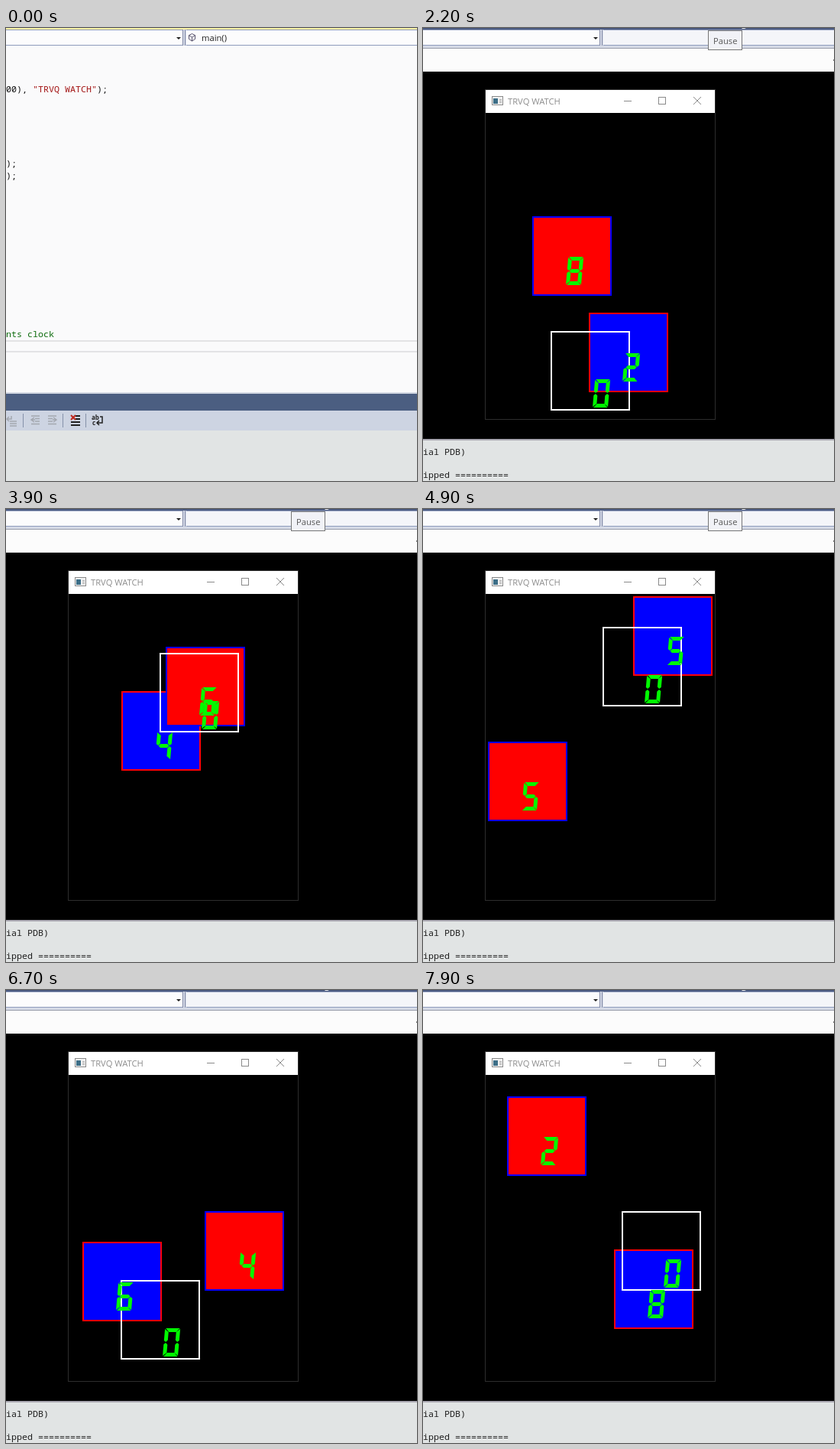
Animation, 538 px wide and 592 px high, one loop 8000 ms. Source, as an HTML page:

```html
<!DOCTYPE html>
<html lang="en">
<head>
<meta charset="utf-8">
<title>Bouncing clock</title>
<style>
  html, body { margin: 0; width: 100%; height: 100%; overflow: hidden; background: #000; }
  svg { display: block; width: 538px; height: 592px; }
  text { font: 11.2px "Open Sans", "Noto Sans", sans-serif; white-space: pre; }
  .code { font: 11.67px "Noto Sans Mono", "DejaVu Sans Mono", monospace; }
  .crisp { shape-rendering: crispEdges; }
  .digit { fill: #00fa00; }
</style>
</head>
<body>
<svg viewBox="0 0 538 592">
  <defs>
    <clipPath id="client"><rect x="82" y="111" width="300" height="400"/></clipPath>
    <g id="nav">
      <rect y="3" width="538" height="20" fill="#fcfcfd"/>
      <path d="M0 2.5H538M0 22.5H538" stroke="#8e9bbc"/>
      <rect x="231" y="2" width="5" height="21" fill="#d6dbe9"/>
      <path d="M231.5 2V23M234.5 2V23" stroke="#8088a4"/>
      <path d="M223 12h6l-3 3z" fill="#1e1e1e"/>
      <text class="code" x="-5" y="17">)</text>
    </g>
    <g id="indent" fill="none" stroke="#a4a8b0" stroke-width="1.5">
      <path d="M1 1H12M6 4.5H12M6 8H12M1 11.5H12M5 3L1 6l4 3M1 6H6"/>
    </g>
  </defs>

  <g id="editor">
    <rect width="538" height="592" fill="#fafafb"/>
    <rect width="538" height="2" fill="#fff0a5"/>
    <use href="#nav"/>
    <path d="M243.500 7.500l4 2v5l-4 2.500-4-2.500v-5zM239.500 9.500l4 2.500 4-2.500M243.500 12v5" fill="none" stroke="#55506a"/>
    <text x="256" y="17" fill="#1e1e1e">main()</text>
    <g class="code" fill="#111">
      <text class="code" y="84">00), <tspan fill="#a31515">"TRVQ WATCH"</tspan>);</text>
      <text class="code" y="181">);</text>
      <text class="code" y="197">);</text>
      <text class="code" y="404" fill="#0b6b0b">nts clock</text>
    </g>
    <path d="M0 409H538M0 423H538" stroke="#e3e3e5" stroke-width="2"/>
    <rect y="476" width="538" height="2" fill="#d3d8e3"/>
    <rect y="478" width="538" height="22" fill="#4b5e81"/>
    <rect y="500" width="538" height="26" fill="#cdd4e2"/>
    <rect y="526" width="538" height="66" fill="#e1e4e4"/>
    <path d="M22.500 504V522M74.500 504V522M104.500 504V522" stroke="#8591a9"/>
    <g fill="none" stroke="#a4a8b0" stroke-width="1.500">
      <path d="M4 508l-3 3 3 3M1 511h6v-4M5 514h9M5 517h9M5 520h9"/>
    </g>
    <use href="#indent" x="32" y="506"/>
    <use href="#indent" transform="translate(67 506) scale(-1 1)"/>
    <path d="M91 507h6M91 511h6M85 515h12M85 519h12" stroke="#222" stroke-width="2"/>
    <path d="M85 506l6 6M91 506l-6 6" stroke="#c0281c" stroke-width="2"/>
    <text x="112" y="512" style="font-size:8px;font-weight:700" fill="#222">ab</text>
    <text x="113" y="519" style="font-size:8px;font-weight:700" fill="#222">c</text>
    <path d="M123 508h3v8h-6M122 513l-3 3 3 3" fill="none" stroke="#222" stroke-width="1.500"/>
  </g>

  <g id="debug">
    <rect width="538" height="592" fill="#000"/>
    <rect width="538" height="3" fill="#4b5a80"/>
    <path d="M417 0h6l-2 1h-3z" fill="#eee"/>
    <use href="#nav"/>
    <rect x="236" y="3" width="302" height="19" fill="#f4f5f9"/>
    <rect y="23" width="538" height="4" fill="#d5dae6"/>
    <path d="M0 26.500H538" stroke="#9a9eab"/>
    <rect y="27" width="538" height="30" fill="#fcfcfc"/>
    <rect x="537" y="41" width="1" height="2" fill="#777"/>
    <rect y="537" width="538" height="55" fill="#e1e4e4"/>
    <path d="M0 538H538" stroke="#a9a6b0" stroke-width="2"/>
    <text class="code" y="558" fill="#1e1e1e">ial PDB)</text>
    <text class="code" y="588" fill="#1e1e1e">ipped ==========</text>

    <g class="crisp">
      <rect x="81.500" y="80.500" width="301" height="431" fill="#000" stroke="#2d2d2d"/>
      <rect x="82" y="81" width="300" height="30" fill="#fff"/>
      <rect x="90.500" y="89.500" width="14" height="11" fill="#f2f2f2" stroke="#8a8a8a"/>
      <rect x="92" y="92" width="6" height="7" fill="#3d6f88"/>
      <path d="M100 93.500h3M100 95.500h3M100 97.500h3" stroke="#aaa"/>
      <path d="M263 95.500h10" stroke="#8a8a8a"/>
      <rect x="308.500" y="90.500" width="9" height="9" fill="none" stroke="#8a8a8a"/>
    </g>
    <path d="M354 90l10 10M364 90l-10 10" stroke="#8a8a8a"/>
    <text x="111" y="100" fill="#8c8c8c">TRVQ WATCH</text>
    <g id="stage" clip-path="url(#client)"></g>

    <g id="tip">
      <rect x="373.500" y="3.500" width="44" height="25" fill="#f1f2f7" stroke="#767676"/>
      <text x="380" y="21" fill="#575757">Pause</text>
    </g>
  </g>
</svg>
<script>
const LOOP = 8000, STEP = 100;
const $ = id => document.getElementById(id);

const segments = {
  a: 'M1 0H19.500L15 5H5.500Z',
  b: 'M20 1V16L17.500 18L15 15.500V5Z',
  c: 'M20 36V21L17.500 19L15 21.500V32Z',
  d: 'M1 37H19.500L15 32H5.500Z',
  e: 'M0 36V21L2.500 19L5 21.500V32Z',
  f: 'M0 1V16L2.500 18L5 15.500V5Z',
  g: 'M3 18.500L5.500 16H14.500L17 18.500L14.500 21H5.500Z'
};
const lit = ['abcdef', 'bc', 'abdeg', 'abcdg', 'bcfg', 'acdfg', 'acdefg', 'abc', 'abcdefg', 'abcdfg'];

// Distance travelled along each axis, as [seconds, pixels].
const travel = [[0, 0], [1, 118], [2.2, 263], [3.9, 471], [5.8, 706], [6.7, 820], [7.9, 970]];

// Every box runs the same diagonal path, offset by its lead.
const boxes = [
  { lead: 0, fill: '#00f', line: '#f00', inset: [42, 51], value: s => s },
  { lead: 200, fill: '#f00', line: '#00f', inset: [42, 51], value: s => 10 - s },
  { lead: 50, fill: 'none', line: '#fff', inset: [53, 61], value: () => 0 }
];

function add(tag, parent, attrs) {
  const el = document.createElementNS('http://www.w3.org/2000/svg', tag);
  for (const key in attrs) el.setAttribute(key, attrs[key]);
  return parent.appendChild(el);
}

for (const box of boxes) {
  box.rect = add('rect', $('stage'), {
    x: -1, y: -1, width: 102, height: 102,
    fill: box.fill, stroke: box.line, 'stroke-width': 2, class: 'crisp'
  });
}
for (const box of boxes) box.label = add('g', $('stage'), { class: 'digit' });

function distance(sec) {
  let i = 1;
  while (i < travel.length - 1 && sec > travel[i][0]) i++;
  const [t0, p0] = travel[i - 1], [t1, p1] = travel[i];
  return Math.round(p0 + (p1 - p0) * (sec - t0) / (t1 - t0));
}

function bounce(p, max) {
  const m = p % (2 * max);
  return m < max ? m : 2 * max - m;
}

function showNumber(box, n) {
  if (box.shown === n) return;
  box.shown = n;
  box.label.replaceChildren();
  [...String(n)].forEach((ch, i) => add('path', box.label, {
    d: [...lit[ch]].map(s => segments[s]).join(''),
    transform: `translate(${i * 26 + 3.2} 0) skewX(-5)`
  }));
}

function show(id, on) {
  $(id).style.display = on ? '' : 'none';
}

function draw(now) {
  const ms = Math.floor((now % LOOP) / STEP) * STEP;
  const sec = ms / 1000;
  show('editor', ms < 100);
  show('debug', ms >= 100);
  show('tip', ms >= 1000 && ms < 6000);

  const p = distance(sec);
  const count = Math.floor(sec + 0.12);
  for (const box of boxes) {
    const x = 82 + bounce(p + box.lead, 200);
    const y = 111 + bounce(p + box.lead, 300);
    box.rect.setAttribute('transform', `translate(${x} ${y})`);
    box.label.setAttribute('transform', `translate(${x + box.inset[0]} ${y + box.inset[1]})`);
    showNumber(box, box.value(count));
  }
}

function tick() {
  draw(performance.now());
  requestAnimationFrame(tick);
}
tick();
</script>
</body>
</html>
```
